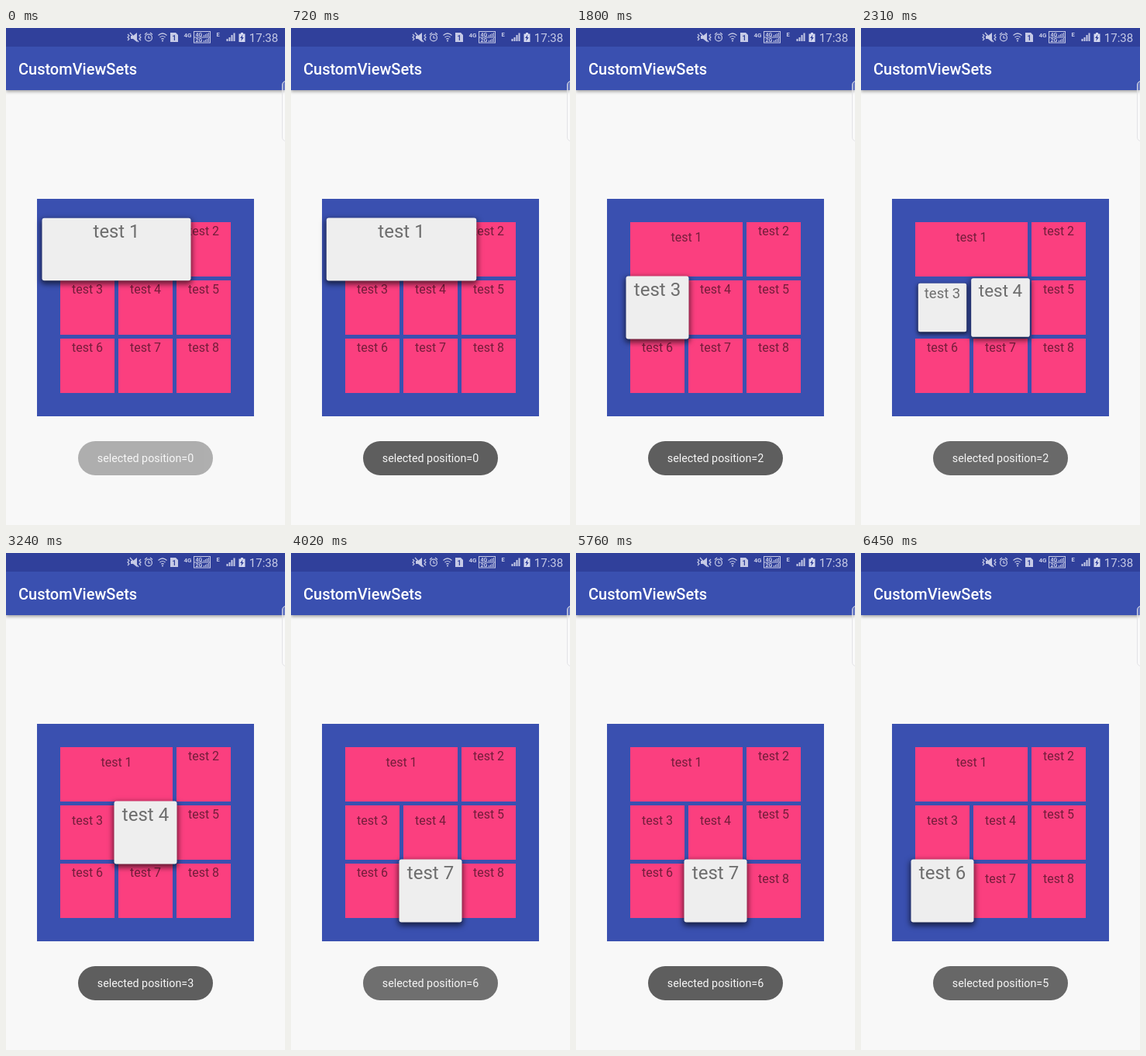
Recreate the animation shown at these times as an HTML page. Size 360 px wide and 640 px high, loop 6480 ms.

```html
<!DOCTYPE html>
<html lang="en">
<head>
<meta charset="utf-8">
<title>CustomViewSets</title>
<style>
  html, body { margin: 0; width: 100%; height: 100%; overflow: hidden; }
  body { position: relative; background: #f8f8f8; font-family: Roboto, "Noto Sans", sans-serif; }
  #stage { position: absolute; left: 0; top: 0; width: 360px; height: 640px; overflow: hidden; }
  #stage div { position: absolute; box-sizing: border-box; }
  svg { position: absolute; left: 0; top: 0; }
  #status { left: 0; top: 0; width: 360px; height: 24px; background: #30409b; }
  #bar { left: 0; top: 24px; width: 360px; height: 56px; background: #3a50b0;
    box-shadow: 0 2px 4px rgba(0, 0, 0, .35);
    color: #fff; font-size: 20px; font-weight: 500; line-height: 58px; padding-left: 16px; }
  #edge { left: 356px; top: 68px; width: 12px; height: 78px; border: 1px solid #e2e2e6;
    border-radius: 5px; background: rgba(255, 255, 255, .25); }
  #panel { left: 40px; top: 220px; width: 280px; height: 280px; background: #3a50b0; }
  .cell { height: 70px; color: rgba(0, 0, 0, .54); font-size: 16px; line-height: 23px; text-align: center; }
  .back { inset: 0; background: #fb3f7f; }
  .card .back { inset: 8px; background: #eee; border-radius: 2px;
    box-shadow: 0 2px 5px 1px rgba(0, 0, 0, .6); }
  .label { left: 0; top: 0; width: 100%; }
  .used .label { top: 8px; }
  .toast { left: 93px; top: 532px; width: 174px; height: 44px; border-radius: 22px;
    background: #5e5e5e; color: #f6f6f6; font-size: 14.3px; line-height: 45px; text-align: center; }
</style>
</head>
<body>
<div id="stage">
  <div id="bar">CustomViewSets</div>
  <div id="status"></div>
  <svg width="360" height="24" fill="none" stroke="#c6cae6" stroke-width="1.2">
    <!-- muted speaker with vibration -->
    <path d="M157 8l2 2-2 2 2 2-2 2M174 8l-2 2 2 2-2 2 2 2M160 6l11 12"/>
    <path d="M161 10h3l5-4v12l-5-4h-3z" fill="#c6cae6" stroke="none"/>
    <!-- alarm -->
    <circle cx="184" cy="12.5" r="4.4"/>
    <path d="M184 10v3h2.5M179 8.5l3-2.5M189 8.5l-3-2.5"/>
    <!-- wireless -->
    <path d="M196.500 9.500q5.500-5 11 0M198.500 12q3.500-3 7 0M200.300 14.300q1.700-1.500 3.400 0"/>
    <circle cx="202" cy="16.500" r="1" fill="#c6cae6" stroke="none"/>
    <!-- card slot, two networks -->
    <path d="M212 6h7l3 3v9h-10z" fill="#c6cae6" stroke="none"/>
    <rect x="242.500" y="4.500" width="21" height="14.500" stroke-width="1"/>
    <path d="M243 12h20" stroke-width="1"/>
    <path d="M255.500 11v-2M257.500 11V8M259.500 11V7M261.500 11V6M255.500 18v-2M257.500 18v-3M259.500 18v-4M261.500 18v-5" stroke-width="1"/>
    <!-- signal and battery -->
    <path d="M285.500 17v-3M288.500 17v-5M291.500 17v-8M294.500 17V6.500" stroke-width="2"/>
    <path d="M300.500 7.500h2.500v-1.500h3v1.500h2.500v10.500h-8z" fill="#d4d8f0" stroke="none"/>
    <path d="M305.500 8.500l-3.500 4.500h2l-.8 4 3.600-5h-2z" fill="#30409b" stroke="none"/>
    <g fill="#c6cae6" stroke="none" font-family="Roboto, sans-serif" font-weight="700" text-anchor="middle">
      <text x="217" y="15.500" font-size="9" fill="#30409b">1</text>
      <text x="234.500" y="11.500" font-size="8">4G</text>
      <text x="249" y="11" font-size="7">4G</text>
      <text x="249" y="18.300" font-size="7">2G</text>
      <text x="273.500" y="11" font-size="7.500">E</text>
      <text x="332.500" y="18" font-size="15" font-weight="400">17:38</text>
    </g>
  </svg>
  <div id="edge"></div>
  <div id="panel"></div>
</div>
<script>
const LOOP = 6480, SCALE_MS = 300, SHRINK_LAG = 25, FADE_MS = 250, TOAST_LAG = 190;
const stage = document.getElementById("stage");
const clamp = x => Math.min(1, Math.max(0, x));
const ease = x => (1 - Math.cos(Math.PI * clamp(x))) / 2;

function add(parent, cls, text = "") {
  const el = document.createElement("div");
  el.className = cls;
  el.textContent = text;
  parent.append(el);
  return el;
}

// column, row, column span
const grid = [[0, 0, 2], [2, 0, 1], [0, 1, 1], [1, 1, 1], [2, 1, 1], [0, 2, 1], [1, 2, 1], [2, 2, 1]];
const cells = grid.map(([col, row, span], i) => {
  const el = add(stage, "cell");
  el.style.left = 70 + col * 75 + "px";
  el.style.top = 250 + row * 75 + "px";
  el.style.width = span * 75 - 5 + "px";
  add(el, "back");
  add(el, "label", "test " + (i + 1));
  return el;
});

// cell index, selection time
const picks = [[0, -270], [2, 998], [3, 2099], [6, 3614], [7, 4560], [6, 5290], [5, 6028]]
  .map(([cell, at], i) => ({
    cell, at,
    shown: i ? at + TOAST_LAG : -118,
    toast: add(stage, "toast", "selected position=" + cell)
  }));

function drawCell(el, index, t) {
  const k = picks.findLastIndex(p => p.cell === index && p.at <= t);
  let card = false, scale = 1;
  if (k >= 0) {
    const next = picks[k + 1];
    const left = next ? t - next.at - SHRINK_LAG : -1;
    const grown = ease((t - picks[k].at) / SCALE_MS);
    card = left < SCALE_MS;
    scale = 1 + 0.5 * (grown - ease(left / SCALE_MS));
  }
  el.className = "cell" + (k >= 0 ? " used" : "") + (card ? " card" : "");
  el.style.transform = `scale(${scale})`;
  el.style.zIndex = card ? k + 1 : 0;
}

function draw(t) {
  cells.forEach((el, i) => drawCell(el, i, t));
  picks.forEach((p, i) => {
    const next = picks[i + 1];
    const fadeOut = next ? clamp((t - next.shown) / FADE_MS) : 0;
    p.toast.style.opacity = clamp((t - p.shown) / FADE_MS) - fadeOut;
  });
}

const start = performance.now();
function tick() {
  draw((performance.now() - start) % LOOP);
  requestAnimationFrame(tick);
}
draw(0);
requestAnimationFrame(tick);
</script>
</body>
</html>
```
